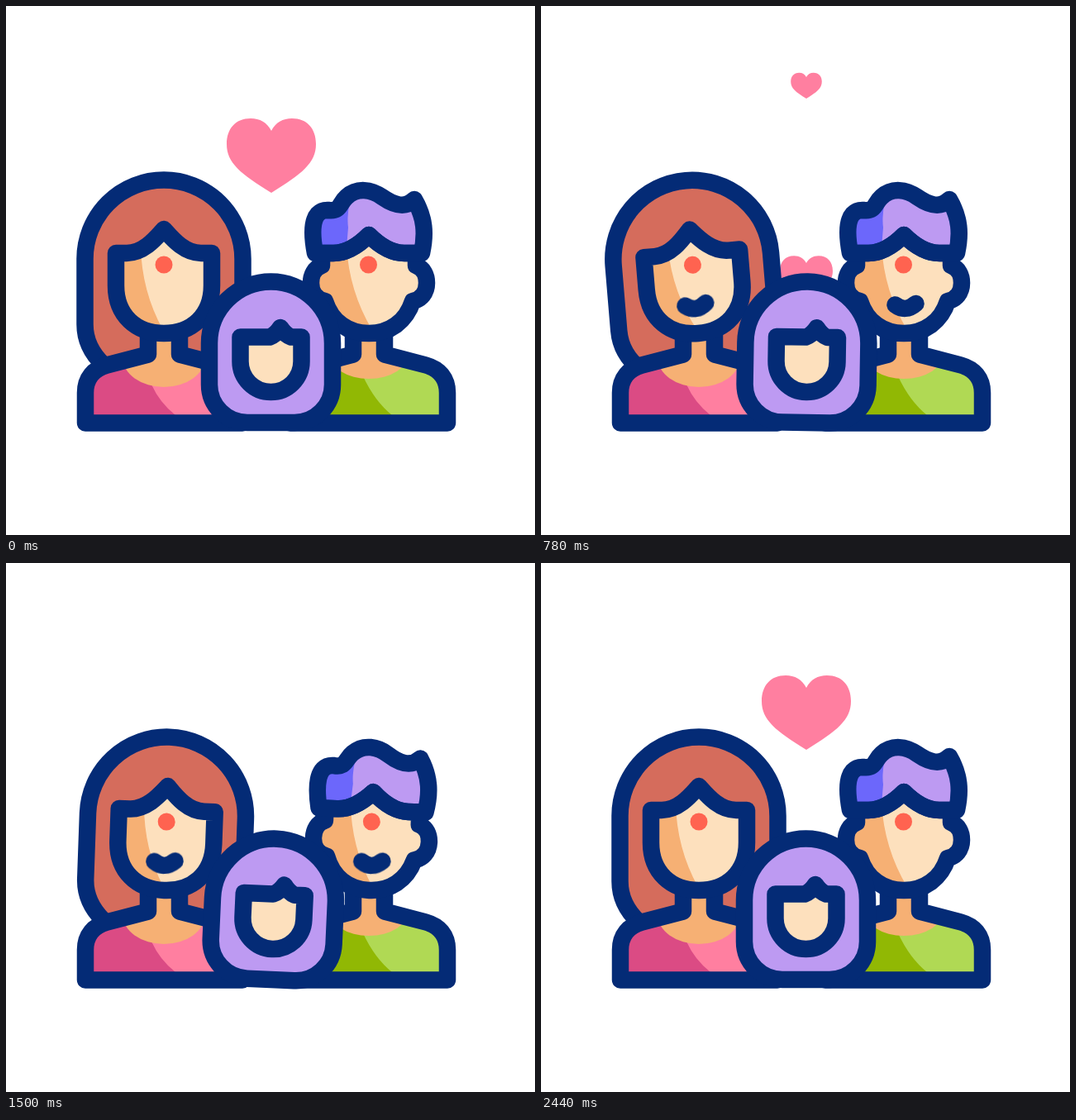
Animation of 640 by 640 pixels, one loop 2.88 s. Source, as an HTML page without scripts:

```html
<!DOCTYPE html>
<html lang="en">
<head>
<meta charset="utf-8">
<title>Family</title>
<style>
  html, body { margin: 0; height: 100%; overflow: hidden; background: #fff; }
  svg { display: block; width: 100vw; height: 100vh; }

  :root {
    --loop: 2880ms;
    --swing: cubic-bezier(.37, 0, .63, 1);
    --lift: cubic-bezier(.5, 0, .6, 1);
    --settle: cubic-bezier(.33, .2, .5, 1);
  }

  .line { stroke: #042b76; stroke-width: 20.5; stroke-linejoin: round; stroke-linecap: round; }
  .bare { fill: none; }
  .skin { fill: #fde0bd; }
  .shade { fill: #f6b074; }
  .bindi { fill: #ff6350; }
  .violet { fill: #bd9af2; }

  .woman, .man, .child { animation: var(--loop) var(--swing) infinite; }
  .woman { transform-origin: 191px 404px; animation-name: woman; }
  .man { transform-origin: 439px 404px; animation-name: man; }
  .child { transform-origin: 320.5px 495px; animation-name: child; }

  @keyframes woman {
    0% { rotate: 0deg; }
    7.64% { rotate: 0deg; animation-timing-function: cubic-bezier(.33, .2, .67, 1); }
    25.69% { rotate: -4.9deg; }
    45.14% { rotate: 4.9deg; }
    64.24% { rotate: -4.9deg; }
    84.72%, 100% { rotate: 0deg; }
  }
  @keyframes man {
    0%, 7.64%, 26.39%, 43.75%, 80.56%, 100% { rotate: 0deg; }
    17.01%, 61.11% { rotate: 5.2deg; }
  }
  @keyframes child {
    0% { rotate: 0deg; }
    7.64% { rotate: 0deg; animation-timing-function: cubic-bezier(.6, 0, .6, 1); }
    21.18%, 47.22% { rotate: 6.5deg; }
    34.2%, 60.42% { rotate: -6.5deg; }
    73.61%, 100% { rotate: 0deg; }
  }

  /* Smiles grow from and shrink to their middle. */
  .mouth { fill: none; animation: var(--loop) var(--swing) infinite; }
  .woman .mouth { animation-name: smile-woman; }
  .man .mouth { animation-name: smile-man; }
  @keyframes smile-woman {
    0%, 7.63% { opacity: 0; stroke-dasharray: 0 200; stroke-dashoffset: -50; }
    7.64% { opacity: 1; stroke-dasharray: 0 200; stroke-dashoffset: -50; }
    12.5%, 64.58% { opacity: 1; stroke-dasharray: 100 200; stroke-dashoffset: 0; }
    74.31% { opacity: 1; stroke-dasharray: 0 200; stroke-dashoffset: -50; }
    74.32%, 100% { opacity: 0; stroke-dasharray: 0 200; stroke-dashoffset: -50; }
  }
  @keyframes smile-man {
    0%, 14.57% { opacity: 0; stroke-dasharray: 0 200; stroke-dashoffset: -50; }
    14.58% { opacity: 1; stroke-dasharray: 0 200; stroke-dashoffset: -50; }
    20.14%, 72.22% { opacity: 1; stroke-dasharray: 100 200; stroke-dashoffset: 0; }
    83.33% { opacity: 1; stroke-dasharray: 0 200; stroke-dashoffset: -50; }
    83.34%, 100% { opacity: 0; stroke-dasharray: 0 200; stroke-dashoffset: -50; }
  }

  .heart { fill: #ff7fa0; transform-origin: 0 0; animation: var(--loop) var(--swing) infinite; }
  .leaving { animation-name: leave-rise, leave-size; animation-timing-function: var(--lift); }
  .passing { animation-name: pass-rise, pass-size; }
  .arriving { animation-name: arrive-rise, arrive-size; animation-timing-function: var(--settle); }
  @keyframes leave-rise {
    0%, 7.64% { translate: 321px 181px; }
    29.51%, 100% { translate: 321px 94px; }
  }
  @keyframes leave-size {
    0%, 7.64% { scale: 1; }
    29.51% { scale: .33; }
    30.9%, 100% { scale: 0; }
  }
  @keyframes pass-rise {
    0%, 18.06% { translate: 321px 383px; }
    49.65%, 100% { translate: 321px 94px; }
  }
  @keyframes pass-size {
    0%, 20.14% { scale: 0; }
    32.64% { scale: 1; }
    49.65% { scale: .33; }
    51.04%, 100% { scale: 0; }
  }
  @keyframes arrive-rise {
    0%, 50% { translate: 321px 383px; }
    82.64%, 100% { translate: 321px 181px; }
  }
  @keyframes arrive-size {
    0%, 50% { scale: 0; }
    71.53%, 100% { scale: 1; }
  }
</style>
</head>
<body>
<svg viewBox="0 0 640 640">
  <defs>
    <path id="heart" d="M0-30C-5-40-14-45-25-45C-43-45-54-33-54-14C-54 9-37 22 0 45C37 22 54 9 54-14C54-33 43-45 25-45C14-45 5-40 0-30Z"/>
    <path id="mouth" pathLength="100" d="M-12.5-4.5Q0 5 12.5-6"/>
    <path id="body" d="M172 390V421.500L122 434.500C106 439 96 450 96 468V504.500H286V468C286 450 276 439 260 434.500L210 421.500V390Z"/>
    <path id="face-w" d="M133 299V338C133 375 158 396 191 396C224 396 249 375 249 338V299H236C215 299 200 280 191 270C182 280 167 299 146 299Z"/>
    <path id="face-m" d="M382 299V314C373 317 369 326 369 335C369 347 376 355 386 357C394 382 414 396 439 396C464 396 484 382 492 357C502 355 509 347 509 335C509 326 505 317 496 314V299H482C463 299 448 286 439 277C430 286 415 299 396 299Z"/>
    <path id="hair-m" d="M374 299C370 278 367 246 390 247C405 249 403 239 412 231C425 219 442 222 455 231C468 240 482 246 494 234C507 256 508 276 503 299H482C463 299 448 286 439 277C430 286 415 299 396 299Z"/>
    <clipPath id="in-body"><use href="#body"/></clipPath>
    <clipPath id="in-face-w"><use href="#face-w"/></clipPath>
    <clipPath id="in-face-m"><use href="#face-m"/></clipPath>
    <clipPath id="in-hair-m"><use href="#hair-m"/></clipPath>
  </defs>

  <use href="#heart" class="heart leaving"/>
  <use href="#heart" class="heart passing"/>
  <use href="#heart" class="heart arriving"/>

  <g class="woman">
    <path class="line" fill="#d56c5c" d="M95.5 306A95.5 95.5 0 0 1 286.5 306V385C286.5 405 279 420 264 434L232 460H150L118 434C103 420 95.5 405 95.5 385Z"/>
  </g>

  <g>
    <use href="#body" fill="#ff7fa0"/>
    <g clip-path="url(#in-body)">
      <path fill="#db4b84" d="M90 420H166L176 458Q186 480 205 495V510H90Z"/>
      <ellipse class="shade" cx="191" cy="425" rx="50" ry="36"/>
    </g>
    <use href="#body" class="line bare"/>
  </g>
  <g transform="translate(248)">
    <use href="#body" fill="#b0d954"/>
    <g clip-path="url(#in-body)">
      <path fill="#91b804" d="M90 420H174L184 448Q198 478 219 495V510H90Z"/>
      <ellipse class="shade" cx="191" cy="420" rx="48" ry="31"/>
    </g>
    <use href="#body" class="line bare"/>
  </g>

  <g class="woman">
    <use href="#face-w" class="skin"/>
    <path class="shade" clip-path="url(#in-face-w)" d="M120 260H163V290Q164 345 190 392V400H120Z"/>
    <use href="#face-w" class="line bare"/>
    <circle class="bindi" cx="191" cy="313" r="10.5"/>
    <use href="#mouth" class="mouth line" x="190.5" y="366"/>
  </g>

  <g class="man">
    <use href="#face-m" class="skin"/>
    <path class="shade" clip-path="url(#in-face-m)" d="M350 260H412V290Q415 345 443 392V400H350Z"/>
    <use href="#hair-m" class="violet"/>
    <path fill="#6c67fb" clip-path="url(#in-hair-m)" d="M350 210H424Q411 245 414 268L411 305H350Z"/>
    <use href="#face-m" class="line bare"/>
    <use href="#hair-m" class="line bare"/>
    <circle class="bindi" cx="438.5" cy="313" r="10.5"/>
    <use href="#mouth" class="mouth line" x="441" y="366"/>
  </g>

  <g class="child">
    <path class="line violet" d="M246 408A74.5 74.5 0 0 1 395 408V458A46 46 0 0 1 349 504H292A46 46 0 0 1 246 458Z"/>
    <path class="line skin" d="M283.5 400.5V430A37 37 0 0 0 357.5 430V400.5H345Q338 398 332 389Q326 398 319 400.5Z"/>
  </g>
</svg>
</body>
</html>
```
